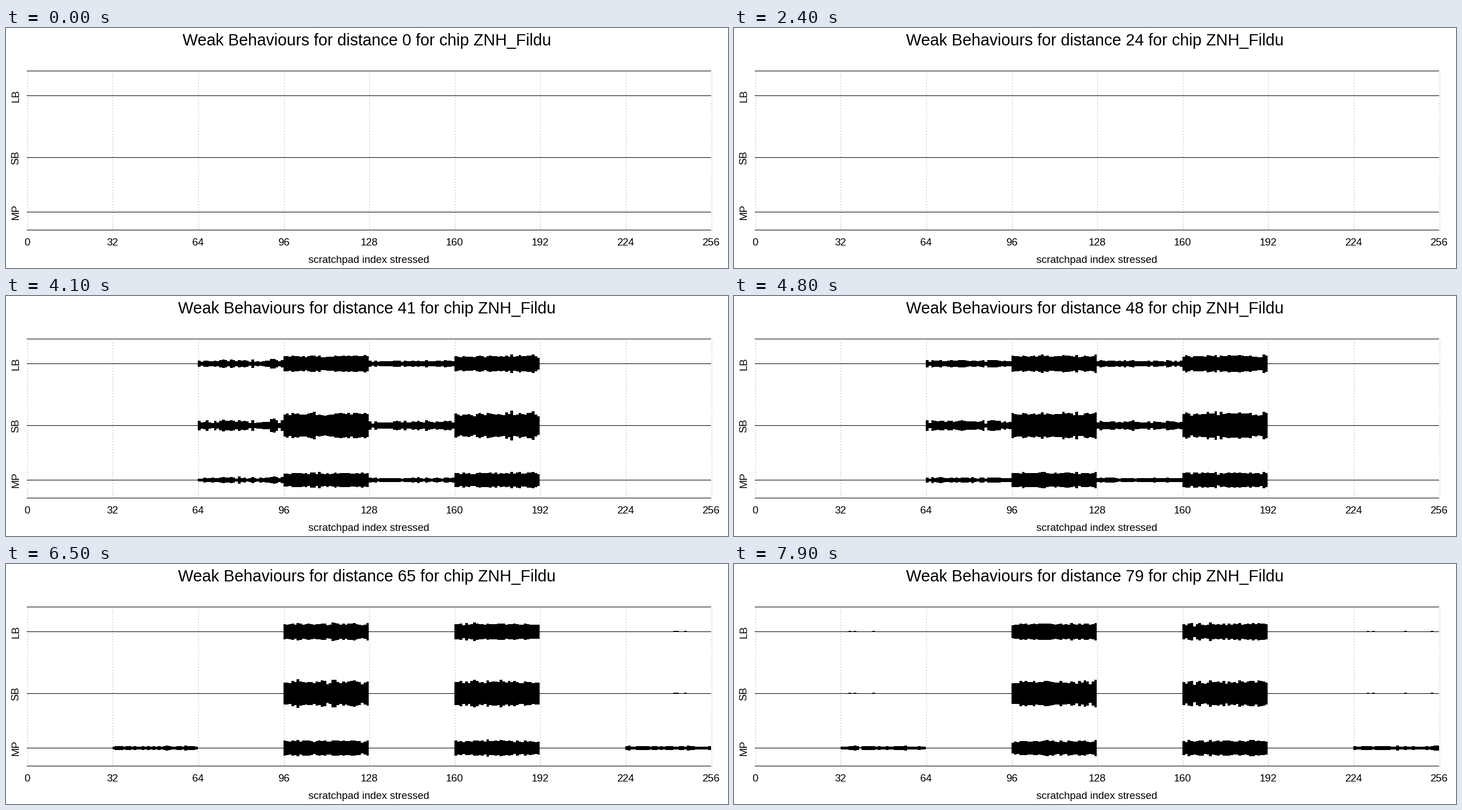
A matplotlib script for the animation above (8 s loop, 1280 px wide and 427 px high).

```python
import numpy as np
import matplotlib.pyplot as plt
from matplotlib.animation import FuncAnimation
from matplotlib.patches import Polygon

W, H, DPI = 1280, 427, 64           # a power of two keeps the size exact
PX = 72 / DPI                       # one pixel in points
LEFT, SPAN, CELLS, PATCH = 37, 1212.6, 256, 32
TOP, BOTTOM = 76, 359
ROWS = {"LB": 120, "SB": 230, "MP": 327}
CHIP = "ZNH_Fildu"

# first cell: (mean half heights for LB, SB, MP in pixels, relative spread)
NEAR = {
    64: ((5, 7.4, 3.8), 0.24),
    96: ((13.2, 20.4, 12), 0.095),
    128: ((4.2, 6, 3.1), 0.2),
    160: ((13.2, 20.4, 12), 0.095),
}
FAR = {
    32: ((0, 0, 2.6), 0.25),
    96: ((13.2, 20.4, 12), 0.095),
    160: ((13.2, 20.4, 12), 0.095),
    224: ((0, 0, 2.6), 0.25),
}

plt.rcParams["font.family"] = "Liberation Sans"
fig = plt.figure(figsize=(W / DPI, H / DPI), dpi=DPI, facecolor="white")
ax = fig.add_axes([0, 0, 1, 1])
ax.set_xlim(0, W)
ax.set_ylim(H, 0)
ax.axis("off")


def cell_x(i):
    return LEFT + SPAN * i / CELLS


def label(x, y, text, size=18.5, **kw):
    return ax.text(x, y, text, fontsize=size * PX, ha="center",
                   va="baseline", color="black", **kw)


def band(zorder=3):
    patch = Polygon(np.zeros((4, 2)), closed=True, facecolor="black",
                    edgecolor="none", antialiased=False, zorder=zorder)
    return ax.add_patch(patch)


def heights(dist):
    """Half height of each cell for the three tests at one distance."""
    h = np.zeros((3, CELLS))
    if dist < PATCH - 1:
        return h
    rng = np.random.default_rng(700 + dist)
    blocks = NEAR if dist < 2 * PATCH - 1 else FAR
    for start, (means, spread) in blocks.items():
        shared = rng.normal(size=PATCH)
        specks = rng.random(PATCH) < 0.08
        for k, mean in enumerate(means):
            own = rng.normal(size=PATCH)
            mix = (0.95, 0.95, 0.7)[k]
            noise = mix * shared + np.sqrt(1 - mix ** 2) * own
            block = np.maximum(np.round(mean * (1 + spread * noise)), 1)
            h[k, start:start + PATCH] = block if mean else specks
    return h


edges = np.round(cell_x(np.arange(CELLS + 1)))
steps = np.repeat(edges, 2)[1:-1]


def outline(row, h):
    up = np.repeat(row - h, 2)
    down = np.repeat(row + 1 + np.where(h > 1, h, 0), 2)
    return np.column_stack([np.r_[steps, steps[::-1]],
                            np.r_[up, down[::-1]]])


for y in (TOP, BOTTOM):
    band().set_xy(outline(y, np.zeros(CELLS)))

for i in range(0, CELLS + 1, PATCH):
    x = np.floor(cell_x(i) + 0.4) + 0.5
    ax.plot([x, x], [TOP + 2, BOTTOM], color="#777777", lw=PX,
            ls=(0, (1, 4)), dash_capstyle="butt", zorder=1)
    label(cell_x(i) + 0.3, 387, str(i))

label(643, 418, "scratchpad index stressed")
for name, row in ROWS.items():
    label(22, row + 0.5, name, rotation=90, rotation_mode="anchor")

title = label(640, 31, "", size=28.7)
bands = [band() for _ in ROWS]


def update(dist):
    title.set_text(f"Weak Behaviours for distance {dist} for chip {CHIP}")
    for patch, row, h in zip(bands, ROWS.values(), heights(dist)):
        patch.set_xy(outline(row, h))
    return [title, *bands]


anim = FuncAnimation(fig, update, frames=80, interval=100,
                     repeat=True, repeat_delay=0, blit=False)
plt.show()
```
